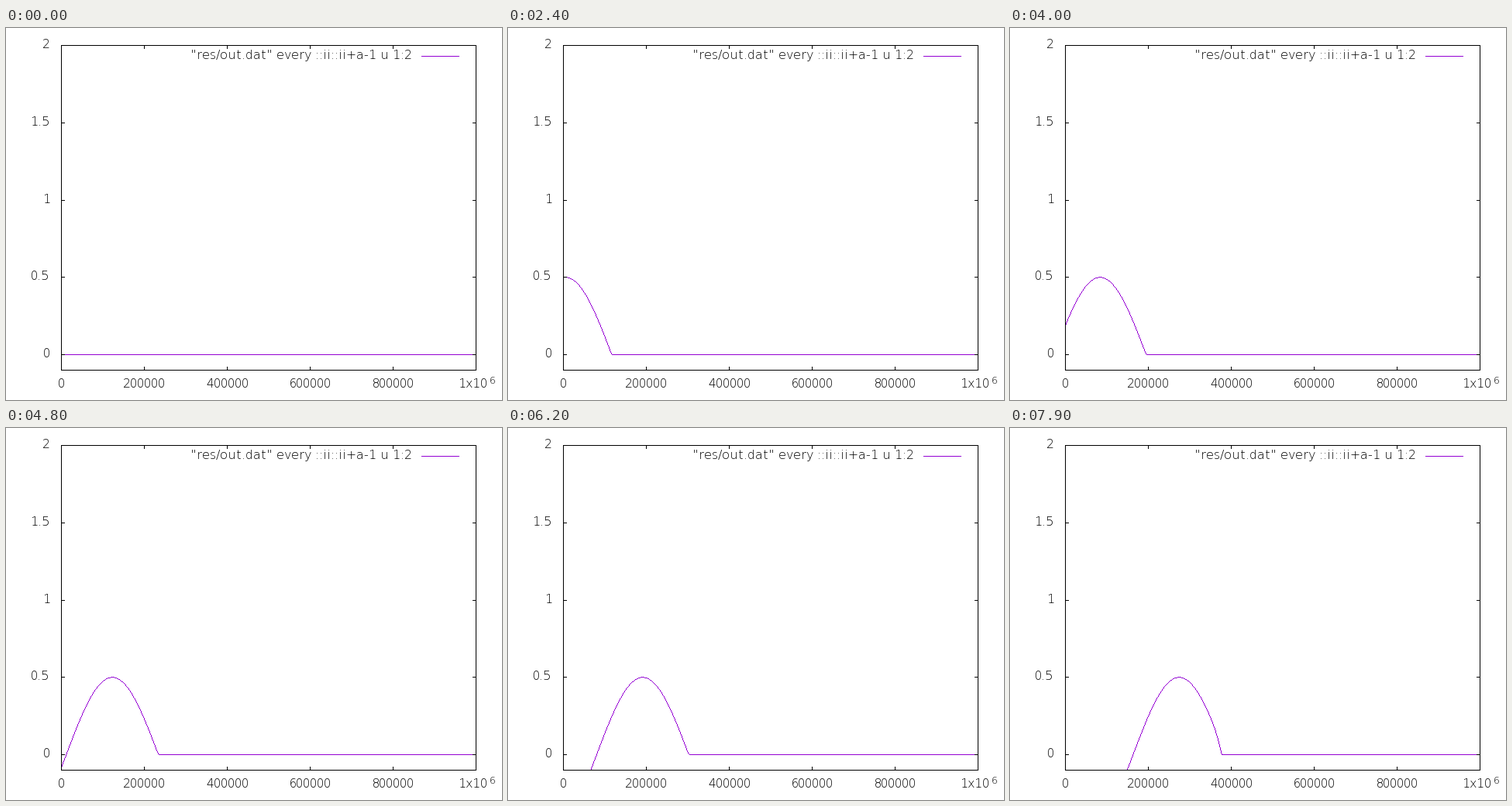
Recreate the animation shown at these times as a matplotlib script. Size 640 by 480 pixels, loop 8 s.

```python
import matplotlib.pyplot as plt
import numpy as np
from matplotlib.animation import FuncAnimation
from matplotlib.patches import Rectangle

# Whole-pixel hinting keeps the thin letters crisp
plt.rcParams["text.hinting"] = "force_autohint"
plt.rcParams["text.hinting_factor"] = 1

W, H, DPI = 640, 480, 100
FRAMES, INTERVAL = 80, 100
LEFT, RIGHT, TOP, BOTTOM = 71, 606, 22, 441
UNIT = (BOTTOM - TOP) / 2.1          # pixels per unit of height
ZERO = TOP + 2 * UNIT
PURPLE = "#9400d3"
PX = 72 / DPI                        # one pixel in points

SPEED = 26.15                        # pixels per second over the deep floor
OMEGA = np.radians(39.6)
DELAY = 0.015
SLOPE_X, SLOPE_LEN = 258.25, 33.0    # the floor rises here and slows the wave
BLUR = 0.6

fig = plt.figure(figsize=(W / DPI, H / DPI), dpi=DPI, facecolor="white")
ax = fig.add_axes([0, 0, 1, 1])
ax.set_xlim(0, W)
ax.set_ylim(H, 0)
ax.axis("off")


def line(xs, ys, color="black", z=3, cap="projecting"):
    """Hard-edged line through pixel centres."""
    return ax.plot(np.asarray(xs) + 0.5, np.asarray(ys) + 0.5, color=color,
                   lw=PX, aa=False, snap=False, zorder=z,
                   solid_capstyle=cap, solid_joinstyle="miter")[0]


def label(x, y, s, ha, size=16):
    ax.text(x, y, s, ha=ha, va="baseline", fontsize=size * PX,
            family="DejaVu Sans", weight=200, color="black", zorder=4)


line([LEFT, RIGHT, RIGHT, LEFT, LEFT], [TOP, TOP, BOTTOM, BOTTOM, TOP])

for i in range(6):
    x = LEFT + round(i * (RIGHT - LEFT) / 5)
    line([x, x], [BOTTOM - 4, BOTTOM])
    line([x, x], [TOP, TOP + 4])
    if i < 5:
        label(x + 0.5, 464, str(i * 200000), "center")
label(583, 464, "1x10", "left")
label(624, 459, "6", "left", 12.8)

for v in (0, 0.5, 1, 1.5, 2):
    y = round(ZERO - v * UNIT)
    line([LEFT, LEFT + 4], [y, y])
    line([RIGHT - 4, RIGHT], [y, y])
    label(57, y + 4, f"{v:g}", "right")

label(523.5, 40, '"res/out.dat" every ::ii::ii+a-1 u 1:2', "right")
line([536, 584], [36, 36], PURPLE)

cols = np.arange(LEFT, RIGHT + 1)
wave = line([], [], PURPLE, 2, "butt")
wave.set_clip_path(Rectangle((LEFT, TOP), RIGHT - LEFT + 1, BOTTOM - TOP + 1,
                             transform=ax.transData))


def surface(x, t):
    """Height of the water on the pixel scale, at position x and time t."""
    rise = np.clip(x - SLOPE_X, 0, 0.99 * SLOPE_LEN)
    path = (np.minimum(x, SLOPE_X) - LEFT
            - SLOPE_LEN * np.log(1 - rise / SLOPE_LEN))
    ahead = BLUR * np.logaddexp(0, (SPEED * (t - DELAY) - path) / BLUR)
    return ZERO + 0.5 - 0.5 * UNIT * np.sin(OMEGA * ahead / SPEED)


def draw(n):
    t = n * INTERVAL / 1000
    row = np.floor(surface(cols, t))
    a, b = surface(cols - 0.5, t), surface(cols + 0.5, t)
    # One upright run of whole pixels per column
    top = np.minimum(row, np.round(np.minimum(a, b)))
    end = np.maximum(row + 1, np.round(np.maximum(a, b)))
    gap = np.full(cols.size, np.nan)
    wave.set_data(np.repeat(cols + 0.5, 3),
                  np.column_stack([top, end, gap]).ravel())
    return wave,


anim = FuncAnimation(fig, draw, frames=FRAMES, interval=INTERVAL,
                     repeat=True, repeat_delay=0, blit=False)
plt.show()
```
